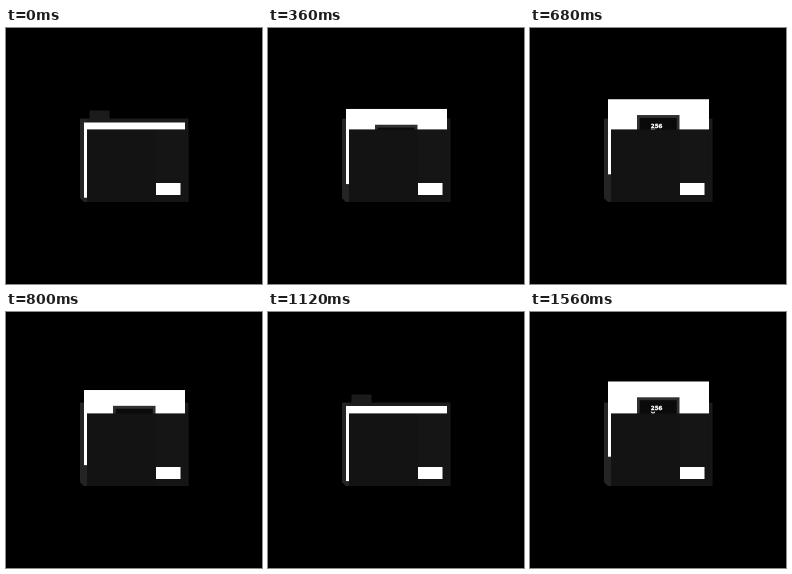
These frames come from a looping animation (256 px wide and 256 px high, 2040 ms). An HTML page:

```html
<!DOCTYPE html>
<html lang="en">
<head>
<meta charset="utf-8">
<title>Folder</title>
<style>
  html, body { margin: 0; width: 100%; height: 100%; overflow: hidden; background: #000; }
  svg { display: block; width: 100%; height: 100%; }
  text { font: bold 5.6px "DejaVu Sans", sans-serif; fill: #fff; stroke: #fff; stroke-width: .3px; }

  #paper { animation: slide 2040ms infinite paused; }

  @keyframes slide {
    0% { transform: translateY(0); }
    1.961% { transform: translateY(0); animation-timing-function: cubic-bezier(.3, .2, .75, .9); }
    30.882% { transform: translateY(-24px); animation-timing-function: cubic-bezier(.36, 0, .64, 1); }
    52.941% { transform: translateY(0); animation-timing-function: cubic-bezier(.33, 0, .58, 1); }
    76.47%, 100% { transform: translateY(-25px); }
  }
</style>
</head>
<body>
<svg viewBox="0 0 256 256">
  <path id="back" fill="#1b1b1b" d="M74 90.5H83.5V82.5H103.5V90.5H182.5V174H78L74 170Z"/>
  <path id="spine" fill="#242424" d="M74 91H81V174H78L74 170Z"/>
  <g id="paper">
    <rect x="78" y="94.5" width="101" height="75.2" fill="#fff"/>
    <rect x="107" y="110.3" width="42.5" height="50" fill="#303030"/>
    <rect x="109.7" y="113.2" width="37" height="44" fill="#0a0a0a"/>
    <text x="120.8" y="123.2">256</text>
    <text x="121" y="128.6">Y</text>
  </g>
  <g id="front">
    <rect x="81" y="101.4" width="69" height="72.6" fill="#131313"/>
    <rect x="150" y="101.4" width="31.5" height="72.6" fill="#151515"/>
  </g>
  <rect id="label" x="150" y="155" width="24.5" height="12" fill="#fff"/>
</svg>
<script>
  const LOOP = 2040, STEP = 40;
  const [slide] = document.getElementById('paper').getAnimations();
  const start = performance.now();

  // The motion advances in steps of 40 ms.
  function draw() {
    const t = (performance.now() - start) % LOOP;
    slide.currentTime = Math.floor(t / STEP) * STEP;
    requestAnimationFrame(draw);
  }
  draw();
</script>
</body>
</html>
```
